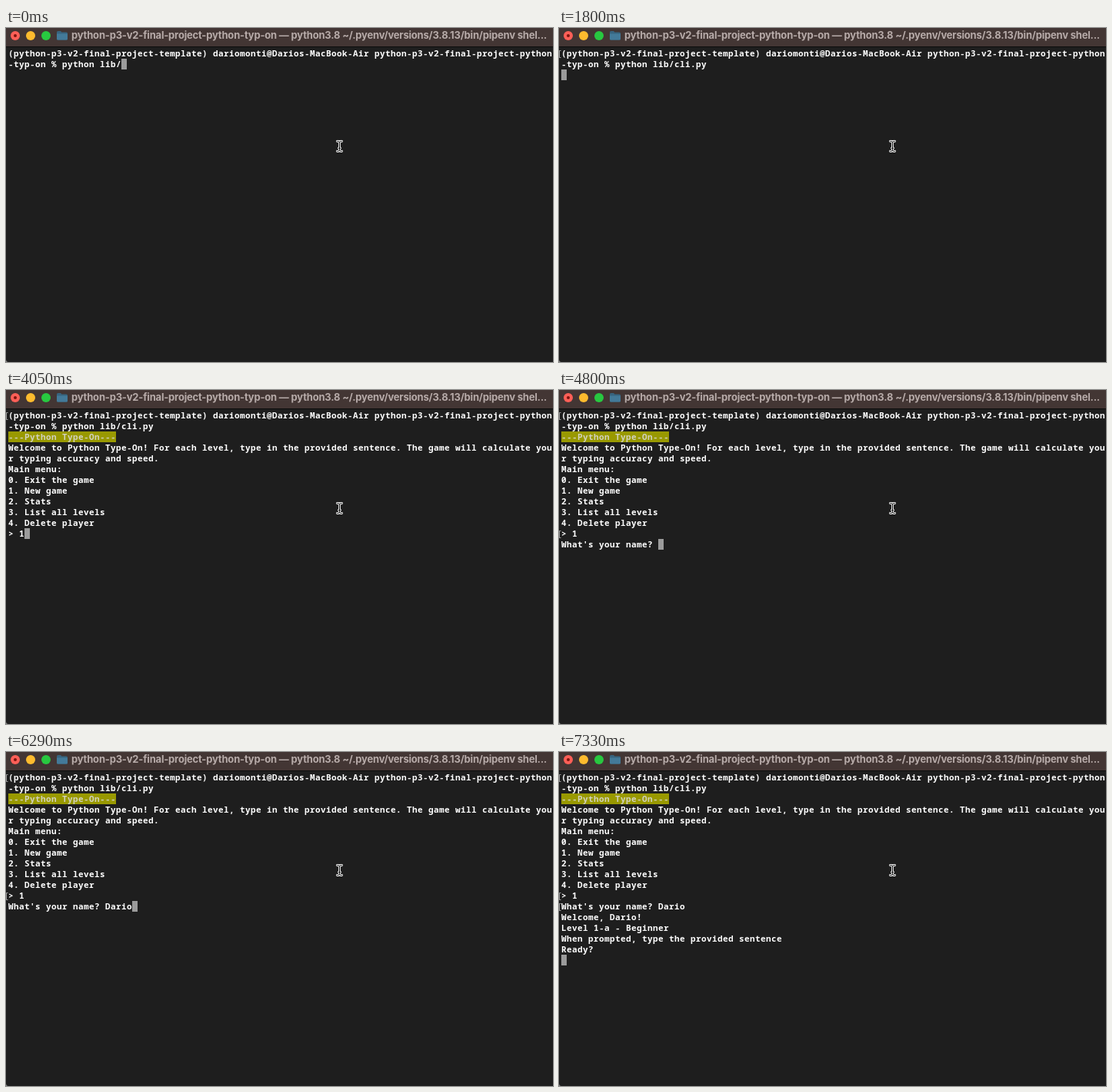
An HTML page that plays this animation: 711 px wide and 435 px high, repeating every 8000 ms.

```html
<!DOCTYPE html>
<html lang="en">
<head>
<meta charset="utf-8">
<title>Typing game in a terminal</title>
<style>
html, body { margin: 0; width: 100%; height: 100%; overflow: hidden; background: #1e1e1e; }
svg { display: block; }
text { white-space: pre; }
.mono { font: 600 11px "Noto Sans Mono", monospace; letter-spacing: .4px; fill: #fff; }
.title { font: 700 13px Inter, sans-serif; letter-spacing: -.195px; fill: #b7aba9; }
</style>
</head>
<body>
<svg width="711" height="435" viewBox="0 0 711 435">
  <rect width="711" height="435" fill="#1e1e1e"/>
  <rect width="711" height="24" fill="#433634"/>
  <rect y="24" width="711" height="1" fill="#0c0c0c"/>
  <path d="M0 432v3h3q-2.500 0-3-3z" fill="#8a8a8a"/>
  <circle cx="12" cy="10" r="6" fill="#fe5f57"/>
  <circle cx="12" cy="10" r="2" fill="#7d1510"/>
  <circle cx="32" cy="10" r="6" fill="#febb2e"/>
  <circle cx="52" cy="10" r="6" fill="#28c840"/>
  <path d="M66 5.500q0-1.500 1.500-1.500h3.500l1.500 1.500h6q1.500 0 1.500 1.500v7q0 1.500-1.500 1.500h-11q-1.500 0-1.500-1.500z" fill="#37647f"/>
  <path d="M66 7.500h14v6.500q0 1.500-1.500 1.500h-11q-1.500 0-1.500-1.500z" fill="#437a99"/>
  <text class="title" x="85" y="14">python-p3-v2-final-project-python-typ-on — python3.8 ~/.pyenv/versions/3.8.13/bin/pipenv shel...</text>
  <rect id="band" x="3" y="54" width="140" height="14" fill="#999900"/>
  <g id="marks" fill="none" stroke="#a0a0a0"></g>
  <g id="rows"></g>
  <rect id="cursor" width="7" height="14" fill="#9b9b9b"/>
  <g id="pointer" fill="none" stroke-linecap="round" stroke-linejoin="round"></g>
</svg>
<script>
const LOOP = 8000, CELL = 7, LINE = 14, LEFT = 3, TOP = 26;
const $ = id => document.getElementById(id);
const SVG = "http://www.w3.org/2000/svg";

function add(parent, tag, attrs) {
  const el = document.createElementNS(SVG, tag);
  for (const k in attrs) el.setAttribute(k, attrs[k]);
  return parent.appendChild(el);
}

// text pointer: white outline around a dark beam
const beam = "M430.5 147.5h1q2 0 2 2q0-2 2-2h1M433.5 149.5v9M430.5 160.5h1q2 0 2-2q0 2 2 2h1M432.5 156.5h2";
add($("pointer"), "path", { d: beam, stroke: "#fff", "stroke-width": 2.8 });
add($("pointer"), "path", { d: beam, stroke: "#111", "stroke-width": 1 });

const prompt = "(python-p3-v2-final-project-template) dariomonti@Darios-MacBook-Air python-p3-v2-final-project-python\n-typ-on % python lib/";
const menu = `---Python Type-On---
Welcome to Python Type-On! For each level, type in the provided sentence. The game will calculate you
r typing accuracy and speed.
Main menu:
0. Exit the game
1. New game
2. Stats
3. List all levels
4. Delete player
> `;
const level = `Welcome, Dario!
Level 1-a - Beginner
When prompted, type the provided sentence
Ready?
`;

// [time, text appended to the screen]
const steps = [
  [0, prompt],
  [300, "cl"], [450, "i"], [750, "."], [900, "p"], [1050, "y"],
  [1800, "\n"], [1950, menu],
  [4050, "1"], [4800, "\nWhat's your name? "],
  [5850, "D"], [6000, "ar"], [6140, "i"], [6290, "o"],
  [7190, "\n"], [7330, level]
];

// [time, row] of the bracket beside a submitted line
const marks = [[1800, 0], [4800, 11], [7190, 12]].map(([at, row]) => {
  const y = TOP + row * LINE;
  return { at, el: add($("marks"), "path", { d: `M2.5 ${y + 3.5}h-2v9h2` }) };
});

const rows = Array.from({ length: 18 }, (_, i) =>
  add($("rows"), "text", { class: "mono", x: LEFT, y: TOP + i * LINE + 11 }));
rows[2].style.fill = "#d2d2c0";

function draw(t) {
  const lines = steps.filter(s => s[0] <= t).map(s => s[1]).join("").split("\n");
  rows.forEach((el, i) => {
    const s = lines[i] || "";
    if (el.textContent !== s) el.textContent = s;
  });
  const last = lines.length - 1;
  $("cursor").setAttribute("x", LEFT + lines[last].length * CELL);
  $("cursor").setAttribute("y", TOP + last * LINE);
  $("band").style.display = lines[2] ? "" : "none";
  for (const m of marks) m.el.style.display = t >= m.at ? "" : "none";
}

const start = performance.now();
function tick(now) {
  draw(Math.max(0, now - start) % LOOP);
  requestAnimationFrame(tick);
}
draw(0);
requestAnimationFrame(tick);
</script>
</body>
</html>
```
